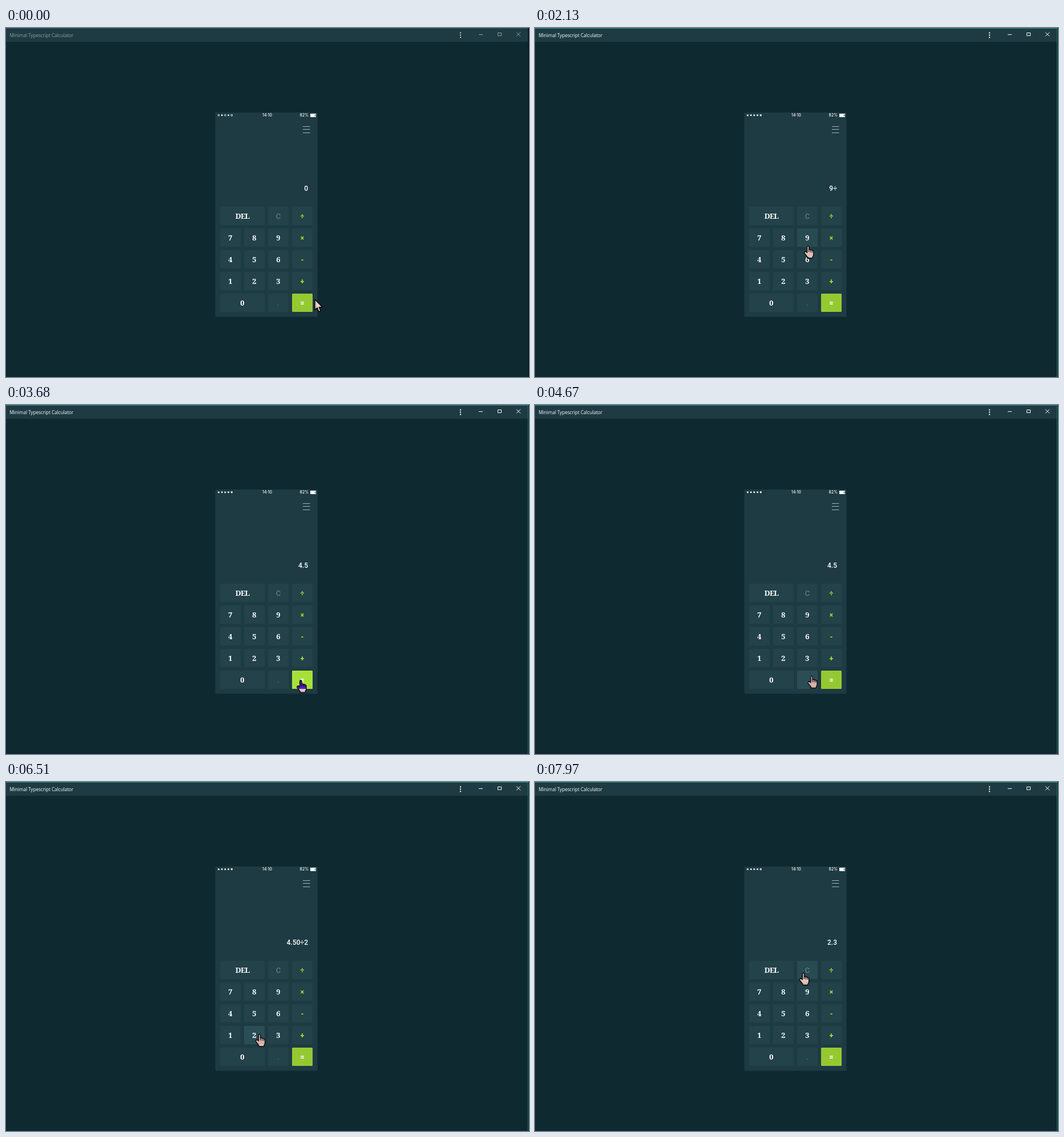
Write an HTML page with a canvas that moves like this. It is 916 by 611 pixels and loops after 8000 ms.

```html
<!DOCTYPE html>
<html lang="en">
<head>
<meta charset="utf-8">
<title>Minimal Typescript Calculator</title>
<style>
  html, body { margin: 0; width: 100%; height: 100%; overflow: hidden; background: #0f2930; }
  canvas { display: block; }
</style>
</head>
<body>
<canvas width="916" height="611"></canvas>
<script>
const ctx = document.querySelector('canvas').getContext('2d');
const LOOP = 8000;
const LIME = '#9fd834', PANEL = '#1e3b43';
const SLAB = '800 13px "Noto Serif", serif';
const SIGN = '900 12px Roboto, sans-serif';
const PLAIN = '400 13px Roboto, sans-serif';

// Keypad: label, column, row, columns spanned
const keys = [
  ['DEL', 0, 0, 2], ['C', 2, 0], ['÷', 3, 0],
  ['7', 0, 1], ['8', 1, 1], ['9', 2, 1], ['×', 3, 1],
  ['4', 0, 2], ['5', 1, 2], ['6', 2, 2], ['-', 3, 2],
  ['1', 0, 3], ['2', 1, 3], ['3', 2, 3], ['+', 3, 3],
  ['0', 0, 4, 2], ['.', 2, 4], ['=', 3, 4],
].map(([label, col, row, span = 1]) => ({
  label, x: 375 + col * 42, y: 313 + row * 38, w: span * 42 - 6, h: 32,
}));

// Pointer stops: time, x, y
const stops = [
  [70, 541, 475], [900, 479, 367], [1290, 477.5, 365], [1430, 477.5, 365],
  [1680, 517, 333], [1830, 517, 333], [2450, 436, 434], [2720, 437, 438],
  [2910, 455, 455], [3250, 517, 480], [3850, 516, 482], [4200, 486, 477],
  [4670, 484.5, 474], [5040, 422, 479], [5280, 422, 479], [5700, 517, 338],
  [5900, 517, 337], [6320, 436, 437], [6460, 437, 438], [6740, 516, 476],
  [7280, 517, 477], [7400, 515, 473], [7660, 491, 400], [7970, 470, 334],
];
const clicks = [1310, 1760, 2620, 3480, 5170, 5830, 6400, 7080];

// Calculator readout after each moment
const readouts = [
  [0, '0'], [1390, '9'], [1830, '9÷'], [2690, '9÷2'], [3560, '4.5'],
  [5240, '4.50'], [5910, '4.50÷'], [6470, '4.50÷2'], [7150, '2.3'],
];

const hand = new Path2D('M-1.6 11V1.6Q0-1 1.6 1.6V7Q3.6 5.8 4.5 7.6Q6.6 6.6 7.4 8.5Q9.7 7.9 9.7 10.5V15Q9.7 18 8 19.5V21.5H-1.2V19.5L-6.2 13.2Q-7 10.3-4.4 10Q-3 10.2-1.6 12Z');
const arrow = new Path2D('M0 0V18.5L4.2 14.7L7 21.5L10 20.2L7.2 13.7H13Z');

function pointerAt(t) {
  const next = stops.findIndex(stop => stop[0] > t);
  if (next <= 0) return (next ? stops.at(-1) : stops[0]).slice(1);
  const [t0, x0, y0] = stops[next - 1], [t1, x1, y1] = stops[next];
  const p = (t - t0) / (t1 - t0), ease = p * p * (3 - 2 * p);
  return [x0 + (x1 - x0) * ease, y0 + (y1 - y0) * ease];
}

const inside = (key, [x, y]) =>
  x >= key.x && x <= key.x + key.w && y >= key.y && y <= key.y + key.h;

// Share of the last 150 ms spent over a key gives its highlight fade
function hoverAmount(key, t) {
  let hits = 0;
  for (let lag = 0; lag < 150; lag += 25) hits += inside(key, pointerAt(t - lag));
  return hits / 6;
}

function rect(color, x, y, w, h) {
  ctx.fillStyle = color;
  ctx.fillRect(x, y, w, h);
}

function text(string, x, y, font, color, align = 'left') {
  ctx.font = font;
  ctx.fillStyle = color;
  ctx.textAlign = align;
  ctx.fillText(string, x, y);
}

function disc(color, x, y, radius) {
  ctx.fillStyle = color;
  ctx.beginPath();
  ctx.arc(x, y, radius, 0, Math.PI * 2);
  ctx.fill();
}

function drawWindow(t) {
  const focused = t >= 1340;
  rect('#0f2930', 0, 0, 916, 611);
  rect(PANEL, 0, 0, 914, 24);
  rect(focused ? '#249180' : '#354f56', 0, 0, 914, 1);
  rect(t >= 1250 ? '#20806f' : '#0a1d22', 914, 0, 1, 611);
  rect('#07151a', 915, 0, 1, 611);
  text('Minimal Typescript Calculator', 6.5, 15.7, '8.1px "Open Sans", sans-serif',
    focused ? '#fff' : '#8fa0a4');

  for (const y of [8.5, 12.5, 16.5]) disc(focused ? '#fff' : '#bcc6c8', 796, y, 1.15);
  ctx.strokeStyle = focused ? '#fff' : '#8fa0a4';
  ctx.lineWidth = 1;
  ctx.beginPath();
  ctx.moveTo(828, 11.5); ctx.lineTo(835, 11.5);
  ctx.rect(861.5, 8.5, 6, 5);
  ctx.moveTo(894, 7.5); ctx.lineTo(901, 14.5);
  ctx.moveTo(901, 7.5); ctx.lineTo(894, 14.5);
  ctx.stroke();
}

function drawStatus(t) {
  const open = (1 + Math.cos(t / 2850 * Math.PI * 2)) / 2;
  for (let i = 0; i < 5; i++) {
    const x = 372.5 + i * 5.7, y = 152.7, grow = i % 2 ? 0 : open;
    if (i < 4) {
      disc('#fff', x, y, 1.45 + grow * .25);
      if (grow > .05) disc(PANEL, x, y, grow * .95);
    } else {
      const half = 1.4 + grow * .2, hole = grow * .9;
      rect('#fff', x - half, y - half, half * 2, half * 2);
      rect(PANEL, x - hole, y - hole, hole * 2, hole * 2);
    }
  }
  const small = '500 6.9px Inter, sans-serif';
  text('14:10', 457.5, 155.4, small, '#fff', 'center');
  text('82%', 530, 155.4, small, '#fff', 'right');
  rect('#fff', 533, 150, 10, 6);
  rect(PANEL, 541, 151, 1, 4);
  for (const y of [172, 177, 183]) rect('#a3b2b5', 520, y, 12.5, 1);
}

function drawKey(key, t) {
  const { label, x, y, w, h } = key;
  const equals = label === '=';
  const fill = (color, alpha) => {
    ctx.globalAlpha = alpha;
    ctx.fillStyle = color;
    ctx.beginPath();
    ctx.roundRect(x, y, w, h, 1.5);
    ctx.fill();
    ctx.globalAlpha = 1;
  };
  fill(equals ? '#95c932' : '#234249', 1);
  fill(equals ? '#a8e03a' : '#2b4e56', hoverAmount(key, t));

  const sign = '÷×-+='.includes(label), dim = 'C.'.includes(label);
  const color = dim ? '#738a8f' : sign && !equals ? LIME : '#fff';
  ctx.letterSpacing = label === 'DEL' ? '-0.9px' : '0px';
  text(label, x + w / 2, y + 21, sign ? SIGN : dim ? PLAIN : SLAB, color, 'center');
  ctx.letterSpacing = '0px';
}

function drawPointer(t) {
  const [x, y] = pointerAt(t);
  if (clicks.some(click => t >= click - 50 && t < click + 80)) {
    disc('rgba(160, 176, 30, .88)', x, y - 1, 8.8);
  }
  const shape = keys.some(key => inside(key, [x, y])) ? hand : arrow;
  ctx.save();
  ctx.translate(x, y);
  // The pointer inverts whatever lies beneath it
  ctx.globalCompositeOperation = 'difference';
  ctx.fillStyle = '#fff';
  ctx.fill(shape);
  ctx.globalCompositeOperation = 'source-over';
  ctx.strokeStyle = '#000';
  ctx.lineWidth = 1.3;
  ctx.lineJoin = 'round';
  ctx.stroke(shape);
  if (shape === hand) {
    ctx.lineWidth = 1;
    ctx.stroke(new Path2D('M1.6 7V11M4.5 8V11.5M7.4 9V12'));
  }
  ctx.restore();
}

function draw(t) {
  drawWindow(t);
  rect(PANEL, 366.5, 148, 179, 357.5);
  drawStatus(t);
  const [, value] = readouts.findLast(([start]) => t >= start);
  text(value, 529, 284.5, '500 12px Roboto, sans-serif', '#fff', 'right');
  keys.forEach(key => drawKey(key, t));
  drawPointer(t);
}

const start = performance.now();
function tick() {
  draw((performance.now() - start) % LOOP);
  requestAnimationFrame(tick);
}
tick();
</script>
</body>
</html>
```
